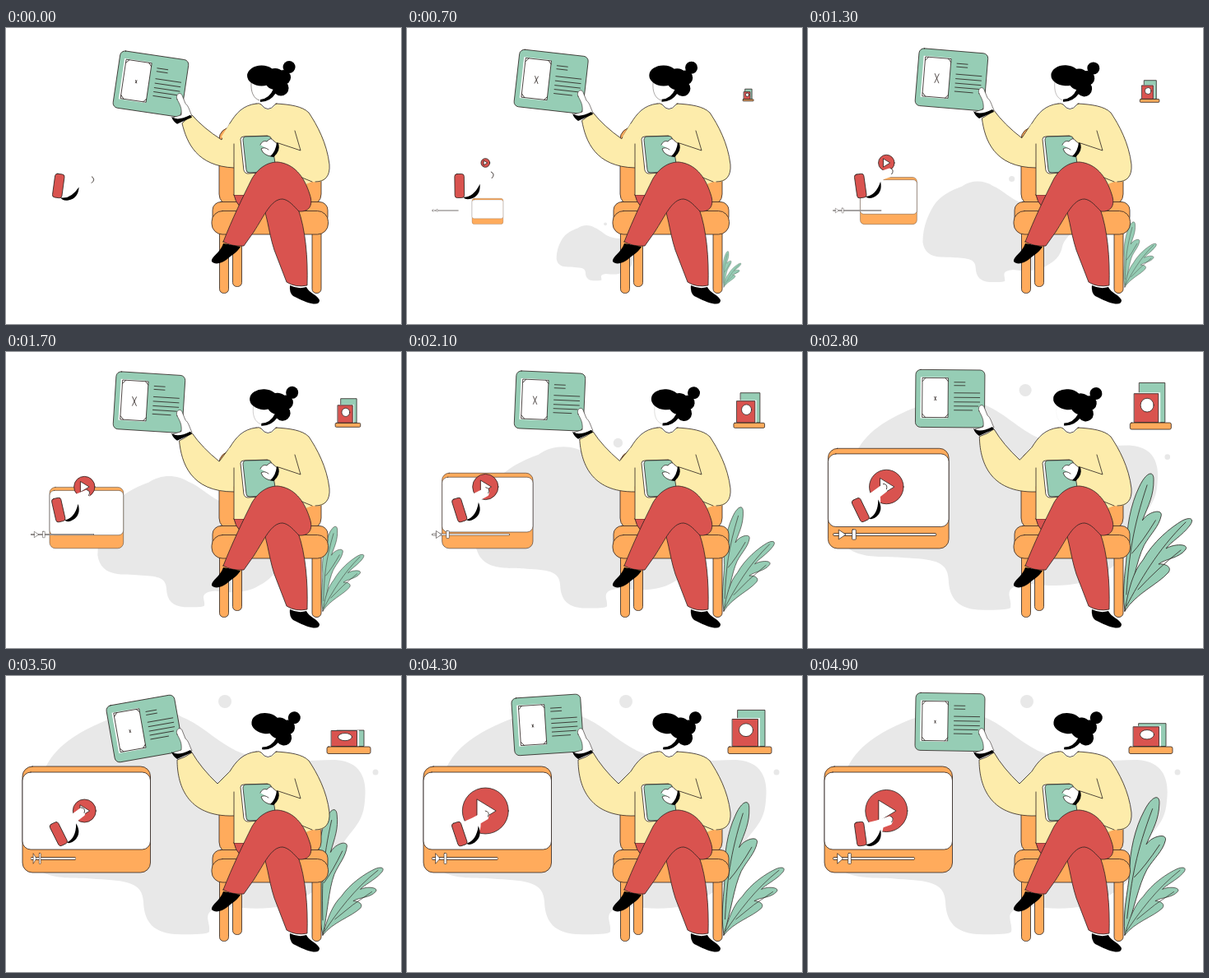
Recreate the animation shown at these times as an HTML page. Size 480 px wide and 360 px high, loop 5 s.

```html
<!DOCTYPE html>
<html lang="en">
<head>
<meta charset="utf-8">
<title>Online lesson</title>
<style>
html, body { margin: 0; width: 100%; height: 100%; overflow: hidden; background: #fff; }
svg { display: block; width: 100vw; height: 100vh; }
.o { fill: #ffab5c; }
.y { fill: #fdecab; }
.r { fill: #d9534f; }
.g { fill: #96cdb5; }
.w { fill: #fff; }
.k { fill: #000; stroke: none; }
.n { fill: none; }
.b { fill: #e8e8e8; stroke: none; }
.p { stroke: none; }
#shelf *, #play *, #mark { vector-effect: non-scaling-stroke; }
</style>
</head>
<body>
<svg viewBox="0 0 480 360" stroke="#2b2320" stroke-width=".8" stroke-linecap="round" stroke-linejoin="round">
  <g id="grown">
    <g id="blob" class="b">
      <path d="M22 205C22 160 38 127 52 104C68 78 100 62 130 51C155 33 190 34 214 50C240 60 262 86 290 95C330 108 365 102 400 102C438 104 438 135 436 152C434 185 412 190 405 215C400 245 380 260 360 270C340 282 310 286 270 280C232 284 250 298 247 311Q245 315 205 314C180 312 168 300 167 275C166 250 145 249 110 247C80 243 30 255 22 205Z"/>
      <circle cx="266" cy="31" r="8"/>
      <circle cx="449" cy="117" r="3.5"/>
    </g>

    <g id="leaf1">
      <path class="g" d="M0 0C-4 -30 2 -50 3 -75C2 -100 8 -130 18 -150C26 -168 36 -172 36 -160C36 -140 30 -130 22 -110C28 -120 46 -125 45 -116C42 -102 32 -94 24 -80C14 -60 10 -30 0 0Z"/>
      <path class="n" d="M2 -20C6 -70 10 -100 28 -153M9 -70Q22 -84 38 -110"/>
    </g>
    <g id="leaf2">
      <path class="g" d="M0 0C4 -25 10 -48 22 -62C34 -84 56 -102 70 -110C80 -115 85 -112 79 -104C70 -92 56 -84 50 -76C60 -82 78 -82 74 -75C66 -64 50 -64 41 -57C48 -58 58 -54 53 -47C40 -32 14 -22 0 0Z"/>
      <path class="n" d="M2 -6C18 -36 40 -75 74 -108M16 -26Q40 -52 68 -74"/>
    </g>

    <g id="shelf">
      <g id="green">
        <rect class="w p" x="404" y="-1.030" width="33" height="1.030"/>
        <rect class="g" x="402" y="-1" width="33" height="1"/>
      </g>
      <g id="red">
        <rect class="w p" x="397" y="-1.040" width="32" height="1.040"/>
        <rect class="r" x="395.500" y="-1" width="31" height="1"/>
        <ellipse class="w" cx="412" cy="-.6" rx="8.500" ry=".24"/>
      </g>
      <rect class="o" x="390" y="86" width="53" height="8.500" rx="2"/>
    </g>

    <g id="player">
      <rect class="o" x="20" y="110" width="155.500" height="129" rx="12"/>
      <rect class="w" x="20" y="117" width="155.500" height="94" rx="10"/>
    </g>
    <g id="bar">
      <path d="M2 0H132" stroke-width="3.500"/>
      <path d="M2 0H132" stroke="#fff" stroke-width="2"/>
      <path class="w" d="M8 -6L17 0L8 6Z"/>
      <rect class="w" x="25" y="-6.500" width="5" height="13" rx="1"/>
    </g>
    <g id="play">
      <circle class="r" r="1"/>
      <path class="w" d="M-.36 -.5L.46 0L-.36 .5Z"/>
    </g>
  </g>

  <g id="tap">
    <path class="w p" d="M63 180L80 173L96 165Q103 167 99 175L90 180Q90 195 74 203Z"/>
    <path class="n" d="M96 165Q102 166 99 172"/>
    <path class="k" d="M72 204Q84 201 87 183Q92 196 82 203Q76 207 72 204Z"/>
    <rect class="r" x="58" y="177.500" width="11.500" height="29" rx="3" transform="rotate(-17 64 192)"/>
  </g>

  <g class="o">
    <rect x="259" y="121" width="124" height="95" rx="14"/>
    <rect x="259.500" y="240" width="11" height="82.500" rx="5"/>
    <rect x="275.500" y="240" width="11" height="74.500" rx="5"/>
    <rect x="372" y="240" width="11" height="82.500" rx="5"/>
    <rect x="251" y="211.500" width="140" height="28" rx="10"/>
    <rect x="250" y="222.500" width="141.500" height="28.500" rx="13"/>
  </g>

  <path class="r" d="M277 203H320L300 226Q280 220 277 203Z"/>
  <path id="sleeve" class="y"/>
  <path class="y p" d="M304 92C290 94 280 103 272 116L262 132L277 165V203H330L372 187C390 190 395 178 392 160C388 135 378 118 368 103C360 95 345 93 328 92Z"/>
  <path class="n" d="M277 141V203M304 92C288 94 280 103 272 116M328 92C345 93 360 95 368 103C378 118 390 140 393 166C394 180 388 187 376 187M351 125L358 149L331 140M323 167L372 187"/>

  <path class="w" d="M285 135Q285 132 289 132L318 131L324 175L294 177Q290 177 289 173Z"/>
  <path class="g" d="M288 136Q288 132 292 132L319 131.500Q322 132 322.500 135L328 171Q328 174 325 174.500L296 176Q292 176 292 173Z"/>
  <path class="w" d="M309 142Q312 136 317 138Q322 132 325 137L331 142L326 156Q318 157 312 151L310 147Q314 144 319 148"/>
  <path class="k" d="M331 140Q334 150 325 157L321 156Q328 150 329 139Z"/>

  <path class="r" d="M309 211C318 225 318 245 326 270L341 309Q352 316 366 313C367 280 364 245 355 220L340 203Z"/>
  <path class="r" d="M264 260C275 232 288 205 299 183C308 168 320 163 330 163C350 165 362 180 369 202C374 216 368 224 356 223C350 217 344 209 336 208C322 208 314 228 301 248L289 265Q274 266 264 260Z"/>
  <path class="k" d="M264 262L285 266C280 274 273 277 269 281C262 287 253 288 250 284C249 278 260 274 264 262ZM345 313Q355 318 365 315C369 323 378 324 381 331Q381 337 371 335C362 333 356 329 349 326Q344 322 345 313Z"/>

  <g id="card">
    <rect class="g" x="-42" y="-35" width="84" height="70" rx="6"/>
    <rect class="w p" x="-36" y="-26" width="33" height="50"/>
    <rect class="w" x="-33.500" y="-25" width="31" height="48"/>
    <path class="n" d="M-33.500 -21L-30 -25M-6 -25L-2.500 -21M-33.500 19L-30 23M-6 23L-2.500 19"/>
    <path class="n" d="M5 -20H18M5 -16H18M5 -7H36M5 -1.500H36M5 4H36M5 9H34M5 14H27"/>
    <path id="mark" class="n" d="M-.5 -1L.5 1M.4 -1L-.4 1"/>
  </g>
  <g id="hand">
    <path class="w" stroke-width=".6" d="M208 72C205 66 212 62 214 67L218 77C222 80 223 86 226 92L209 98L203 94L213 91C214 82 211 78 208 72Z"/>
    <path class="k" d="M201 93Q208 99 224 91L226 94Q212 100 208 102Q203 99 201 93Z"/>
  </g>

  <path class="w p" d="M310 82H327V94Q318 104 310 94Z"/>
  <path class="n" d="M304 92Q308 91 310 93Q318 104 327 93L329 92"/>
  <g id="head">
    <path class="w p" d="M298 64C297 80 302 88 309 89L322 86L326 66Z"/>
    <path id="face" class="n" stroke-width=".5" d="M298 66C297 78 301 86 308 88"/>
    <g class="k">
      <ellipse cx="310.500" cy="58" rx="17.500" ry="12.500"/>
      <circle cx="327" cy="62" r="13"/>
      <circle cx="344" cy="47.500" r="7.500"/>
      <circle cx="337" cy="60" r="9"/>
      <circle cx="334" cy="73" r="9.500"/>
      <path d="M325 74Q320 86 309 87V90Q321 90 328 79Z"/>
    </g>
  </g>
</svg>
<script>
const LOOP = 5000, STEP = 100, INTRO = 3000;
const $ = id => document.getElementById(id);
const move = (id, value) => $(id).setAttribute('transform', value);
const clamp = v => Math.max(0, Math.min(1, v));
const lerp = (a, b, p) => a + (b - a) * p;

const grow = (id, x, y, s) => move(id, `translate(${x} ${y}) scale(${s}) translate(${-x} ${-y})`);
const leaf = (id, turn, size) => move(id, `translate(385 315) rotate(${turn}) scale(${size})`);
const book = (id, height) => move(id, `translate(0 85.5) scale(1 ${height})`);

// q is how far the arm still hangs below its raised pose.
const sleeve = q => `M272 116L${257 + 5 * q} ${131 + 5 * q}
  Q${237 + 3 * q} ${112 + 10 * q} 226 ${93 + 13 * q}
  Q218 ${99 + 13 * q} ${208 + 6 * q} ${102 + 14 * q}
  C${208 + 12 * q} ${130 + 10 * q} ${218 + 14 * q} ${172 - 4 * q} 277 170`;

function draw(t) {
  const s = clamp((t + 30) / INTRO), q = 1 - s;
  const after = Math.max(0, t - INTRO);
  const drop = clamp(after / 500);
  const dip = Math.min(drop, clamp((1900 - after) / 1400));
  const hop = (1 + Math.cos(2 * Math.PI * after / 1500)) / 2;

  $('grown').setAttribute('visibility', t ? 'visible' : 'hidden');
  grow('blob', 233, 305, s);
  grow('player', 98, 238.5, s);
  grow('shelf', 414, 87, s);
  leaf('leaf1', 2 * drop - 8 * dip - 6 * q, s * (1.06 - .05 * drop - .11 * dip));
  leaf('leaf2', 6 * drop, s * (1.06 - .27 * drop));
  book('green', 9 + 42 * hop);
  book('red', 13 + 24 * hop);

  const bar = lerp(s, .29 + after * .00024, drop);
  move('bar', `translate(30 222) scale(${bar} ${s})`);
  const radius = 22 * s - 8 * Math.sin(2 * Math.PI * after / 2050);
  move('play', `translate(95.3 164) scale(${radius})`);
  move('tap', `rotate(${25 - 36 * s + 20 * (after / 1900) ** 2} 64 192)`);

  move('card', `translate(${172.5 + 3.5 * q - 4 * dip} ${56 + 12 * q + 8 * dip}) rotate(${8.5 * q - 11 * dip + drop})`);
  move('mark', `translate(-18 0) scale(${1.5 + 4 * Math.sin(Math.PI * s)})`);
  move('hand', `translate(0 ${16 * q - 1})`);
  $('sleeve').setAttribute('d', sleeve(q));
  move('head', `translate(${2 * s}) rotate(${6 * s} 315 90)`);
  $('face').setAttribute('opacity', q);
}

const start = performance.now();
function tick(now) {
  const t = Math.max(0, now - start) % LOOP;
  draw(Math.floor(t / STEP) * STEP);
  requestAnimationFrame(tick);
}
draw(0);
requestAnimationFrame(tick);
</script>
</body>
</html>
```
